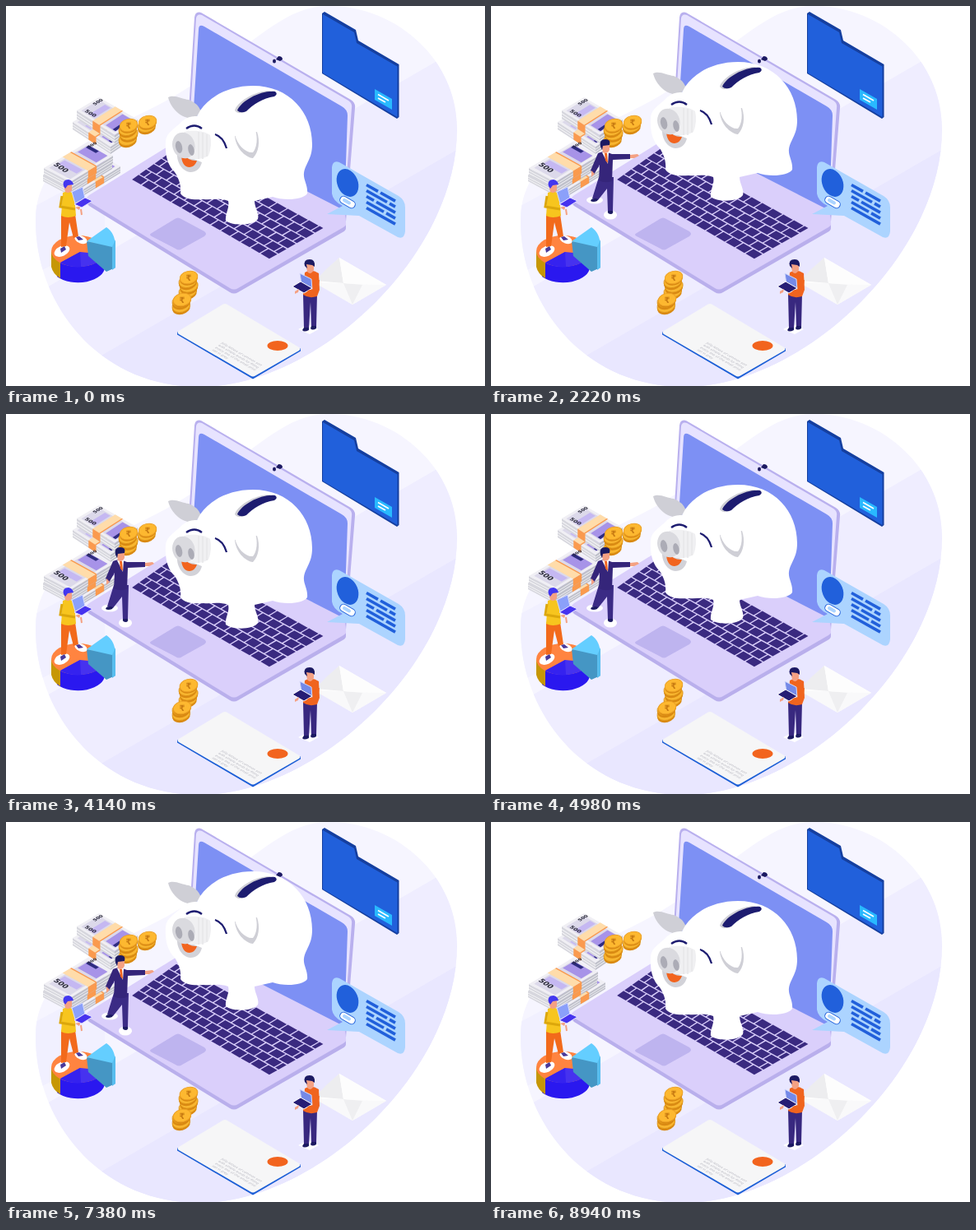
These frames come from a looping animation (582 by 462 pixels, 9000 ms). An HTML page:

```html
<!DOCTYPE html>
<html lang="en">
<head>
<meta charset="utf-8">
<title>Savings scene</title>
<style>
  html, body { margin: 0; width: 100%; height: 100%; overflow: hidden; background: #fff; }
  svg { display: block; width: 582px; height: 462px; }
  text { font-family: "DejaVu Sans", "Noto Sans", sans-serif; }
</style>
</head>
<body>
<svg viewBox="0 0 582 462" xmlns="http://www.w3.org/2000/svg">
  <defs>
    <clipPath id="blob">
      <path d="M390 0C470 -2 548 62 548 150C548 303 378 463 235 463C112 463 36 362 36 262C36 190 95 165 170 128C275 78 325 0 390 0Z"/>
    </clipPath>
  </defs>

  <g clip-path="url(#blob)">
    <path d="M0 0H582V462H0Z" fill="#f6f5ff"/>
    <path d="M582 33L0 371V462H582Z" fill="#efedff"/>
    <path d="M582 155L52 462H582Z" fill="#e9e7ff"/>
    <path d="M0 262L120 198V280L0 345Z" fill="#f1f0ff"/>
  </g>

  <!-- laptop lid -->
  <path d="M229 14Q230 6 237 8L419 114Q425 118 424 124L413 262L220 160Z" fill="#b9b0ee"/>
  <path d="M231 15Q232 9 238 11L416 115Q421 118 420 124L410 260L222 160Z" fill="#e7e3ff"/>
  <path d="M234 29Q234 21 241 25L408 122Q415 126 415 133L411 250L226 156Z" fill="#7d90f4"/>
  <ellipse cx="326" cy="67" rx="2" ry="2.5" fill="#1c1a62"/>
  <path d="M328 65L331 61Q336 61 336 65L333 67Z" fill="#1c1a62"/>

  <!-- laptop base -->
  <path d="M97 233L277 341L413 265V270Q413 273 409 275L282 348Q277 351 272 348L101 243Q97 240 97 233Z" fill="#b9afec"/>
  <path d="M101 230L214 160Q220 153 226 154L410 248Q413 255 413 264Q414 267 410 269L282 343Q277 346 272 343L101 238Q95 234 101 230Z" fill="#dacffb"/>
  <path d="M177 276L205 259Q209 256 213 259L241 274Q245 277 241 280L214 295Q210 298 206 295L177 280Q173 278 177 276Z" fill="#beb4ef"/>
  <g id="keys" fill="#3a2a80"></g>

  <!-- folder -->
  <path d="M384 9L387 7L425 29L428 42L477.500 71V135L475 137L384 82Z" fill="#153f9f"/>
  <path d="M385 10L423 32L426 45L475.500 73.500V135L385 81.500Z" fill="#2160db"/>
  <path d="M448 101L469 113V126L448 114Z" fill="#29b9ff"/>
  <path d="M452 107.500L465 115M452 112L461 117" stroke="#fff" stroke-width="1.700"/>

  <!-- speech bubble -->
  <path d="M396 196Q397 187 405 190L477 231Q485 236 485 245V274Q484 284 476 281L429 255L390 253L409 243Q397 237 396 228Z" fill="#acd4ff"/>
  <ellipse cx="415" cy="215" rx="12.500" ry="17.500" transform="rotate(-22 415 215)" fill="#2160db"/>
  <rect x="405" y="234" width="20" height="9" rx="4.500" transform="rotate(30 415 238.500)" fill="#fff" stroke="#2160db"/>
  <path d="M411 236L417 239.500" stroke="#acd4ff" stroke-width="4" stroke-linecap="round"/>
  <g id="lines" stroke="#2160db" stroke-width="3.600"></g>

  <!-- envelope -->
  <path d="M405 306L462 339L421 363L374 335Z" fill="#fff"/>
  <path d="M405 306L410 337L376 334L389 320Z" fill="#ededef"/>
  <path d="M410 337L462 339L421 363L374 336Z" fill="#f9f9fa"/>
  <path d="M410 337L433 339L421 363Z" fill="#efeff1"/>
  <path d="M405 306L462 339L425 338L410 337Z" fill="#fdfdfd"/>

  <!-- bank card -->
  <path d="M208 396L300 450L358 416V419.500L300 453.500L208 399.500Z" fill="#1c5fd6"/>
  <path d="M210 395L263 363Q266 361 269 363L356 415Q359 417 356 419L303 449.500Q300 451.500 297 449.500L210 399Q207 397 210 395Z" fill="#f6f6f7"/>
  <ellipse cx="330" cy="413" rx="12.500" ry="6" fill="#f2641e"/>
  <g id="print" font-size="4.400" fill="#b4b4bd"></g>

  <g id="money"></g>
  <g id="coins"></g>

  <!-- piggy bank -->
  <g id="pig">
    <path d="M197 111C204 107 214 113 222 114Q233 118 237 128L230 136C216 139 201 127 197 111Z" fill="#cfcfd6"/>
    <path d="M236 127C248 109 272 97 300 97C344 97 372 129 372 168C372 186 364 191 362 203C361 212 367 217 366 228C361 236 337 237 324 232L302 237C302 245 308 252 306 259C301 267 275 268 267 261C266 252 272 246 270 237C258 233 250 236 240 235C228 236 217 235 212 228C213 220 211 211 205 202C196 193 193 181 194 164C195 153 207 148 214 140Q222 133 232 134Z" fill="#fff"/>
    <path d="M278 127C280 117 303 102 322 103L290 129Q281 132 278 127Z" fill="#cfcfd6"/>
    <path d="M281 127C286 115 310 102 327 104Q331 107 326 110C312 112 300 120 292 128Q285 131 281 127Z" fill="#1d1c70"/>
    <path d="M278 158C279 172 290 184 300 185C307 178 309 165 305 153Z" fill="#cfcfd6"/>
    <path d="M278 156C281 169 291 179 300 178C305 172 306 160 303 151C295 143 282 146 278 156Z" fill="#fff"/>
    <path d="M208 178C207 190 214 201 224 202C231 202 236 198 238 190Z" fill="#d2d2d8"/>
    <path d="M216 153C231 150 243 153 248 157Q251 169 246 182C238 187 228 187 220 185Z" fill="#f0f0f2"/>
    <path d="M234 153V186M239 154V186M244 156V183" stroke="#e6e6e9" stroke-width="1.500"/>
    <path d="M213 181C213 190 217 196 223 196Q230 195 232 188Q222 189 216 180Z" fill="#f2641e"/>
    <ellipse cx="216" cy="169.500" rx="13.500" ry="16" transform="rotate(-18 216 170)" fill="#dadadf"/>
    <ellipse cx="210" cy="171.500" rx="4" ry="7.500" transform="rotate(-12 210 171)" fill="#acacb6"/>
    <ellipse cx="225" cy="175" rx="3.600" ry="7" transform="rotate(-12 225 175)" fill="#acacb6"/>
    <path d="M219 149Q229 142 238 149M254 156Q264 159 268 173" fill="none" stroke="#1d1c70" stroke-width="2.300"/>
  </g>

  <!-- man in a suit -->
  <g id="guide">
    <ellipse cx="126" cy="236" rx="10" ry="4.500" fill="#fff"/>
    <ellipse cx="145" cy="254" rx="8" ry="5.500" fill="#fff"/>
    <path d="M131 208L149 208L148 249L142 250L141 222L130 236L123 234Z" fill="#3b2b85"/>
    <path d="M122 235Q126 233 130 235L129 237Q124 239 121 237Z" fill="#1c1a62"/>
    <path d="M142 249L148 249Q149 252 146 253Q141 253 142 249Z" fill="#1c1a62"/>
    <path d="M130 179Q137 175 147 180L169 180V186L148 187L147 213Q138 216 131 212L132 193L125 205L121 200Z" fill="#35257a"/>
    <path d="M135 178L143 178L142 192Z" fill="#fff"/>
    <path d="M138 179L141 179L142 191L139 188Z" fill="#f2641e"/>
    <path d="M169 181L178 180L180 182L174 185L169 185ZM122 200L126 204L122 208Z" fill="#f4a183"/>
    <path d="M134 167H144V175Q141 181 136 178Z" fill="#f4a183"/>
    <path d="M133 171Q131 162 139 162Q146 162 144 169L136 170L135 175Z" fill="#1c1a62"/>
  </g>

  <!-- pie chart -->
  <path d="M62 309V329A32.500 19 0 0 0 120 317V298Z" fill="#2a18ef"/>
  <path d="M55 298V317Q57 326 66 331V310Z" fill="#c69705"/>
  <ellipse cx="87.500" cy="298" rx="32.500" ry="19" fill="#ff8440"/>
  <path d="M90 299L66 312A32.500 19 0 0 0 120 302Z" fill="#4632ef"/>
  <path d="M90 299L66 312A32.500 19 0 0 0 91 317Z" fill="#3522ef"/>
  <path d="M98 286L133 292V318L122 323L100 304Z" fill="#4596c4"/>
  <path d="M98 286L122 269Q133 276 133 294L129 293Z" fill="#64ceff"/>
  <path d="M129 293L133 284V318L129 321Z" fill="#58bdee"/>

  <!-- person in yellow -->
  <ellipse cx="68" cy="298" rx="10" ry="6" transform="rotate(-25 68 298)" fill="#fff"/>
  <ellipse cx="91" cy="284" rx="8" ry="4.500" transform="rotate(22 91 284)" fill="#fff"/>
  <path d="M67 253H84L88 280L82 282L77 263L73 292L67 293Z" fill="#f26a1b"/>
  <path d="M66 295L71 292L73 296L67 300ZM85 281L89 280L94 284L88 285Z" fill="#4a3a9a"/>
  <path d="M69 227Q77 223 83 229L85 255Q75 259 67 255Z" fill="#f7c51e"/>
  <path d="M68 231L66 244L84 247" fill="none" stroke="#dca70c" stroke-width="3"/>
  <path d="M70 217H80V224Q77 229 72 226ZM84 245L91 243L89 248Z" fill="#f4a183"/>
  <path d="M70 219Q68 211 76 211Q81 212 82 217L75 218L72 222Z" fill="#4337ef"/>
  <path d="M80 226L93 220L96 234L84 240Z" fill="#8ba0fa" stroke="#d7dcff"/>
  <path d="M83 241L96 233L105 237L92 245Z" fill="#4633ef" stroke="#e5e2ff"/>
  <path d="M91 247L92 254" stroke="#f4a183" stroke-width="2"/>

  <!-- man in orange -->
  <path d="M355 393L367 387L380 393L369 399Z" fill="#fff"/>
  <path d="M361 350H378L377 390H371L370 360L368 392H362Z" fill="#38287f"/>
  <path d="M362 391H368V394Q362 397 360 394ZM371 389H377V392Q372 395 370 392Z" fill="#1c1a62"/>
  <path d="M363 324Q371 319 380 325L381 345L378 353Q368 356 361 351Z" fill="#f0641e"/>
  <path d="M364 313H374V321Q370 328 366 323Z" fill="#f4a183"/>
  <path d="M363 316Q361 308 369 308Q376 308 375 317L372 315L365 314L366 319Z" fill="#1c1a62"/>
  <path d="M357 325L371 332L372 345L359 338Z" fill="#7489e8" stroke="#d4dafb"/>
  <path d="M348 341L358 335L372 343L362 349Z" fill="#261d75" stroke="#fff"/>
  <path d="M379 333L377 345L367 348" fill="none" stroke="#f0641e" stroke-width="4"/>
  <path d="M351 347L356 344L355 348L351 350Z" fill="#f4a183"/>
</svg>

<script>
const $ = id => document.getElementById(id);
const mix = (a, b, k) => [a[0] + (b[0] - a[0]) * k, a[1] + (b[1] - a[1]) * k];
const shift = (p, x, y) => [p[0] + x, p[1] + y];
const poly = (pts, fill) =>
  `<polygon points="${pts.map(p => p.map(n => n.toFixed(1))).join(" ")}"${fill ? ` fill="${fill}"` : ""}/>`;
const inQuad = ([a, b, c, d], u, v) => mix(mix(a, b, u), mix(d, c, u), v);
const patch = (q, u0, u1, v0, v1, fill) =>
  poly([[u0, v0], [u1, v0], [u1, v1], [u0, v1]].map(([u, v]) => inQuad(q, u, v)), fill);

function drawKeys() {
  const board = [[152, 211], [320, 308], [387, 270], [207, 172]];
  const rows = 6, cols = 14;
  let out = "";
  for (let r = 0; r < rows; r++) {
    const v0 = (r + 0.06) / rows, v1 = (r + 0.93) / rows;
    const slide = r % 2 ? 0.45 : 0;
    for (let c = 0; c < cols + (slide ? 1 : 0); c++) {
      const left = Math.max(0, c - slide), right = Math.min(cols, c + 1 - slide);
      out += patch(board, (left + 0.05) / cols, (right - 0.06) / cols, v0, v1);
    }
  }
  $("keys").innerHTML = out;
}

function drawLines() {
  const rows = [[438, 452, 455, 473], [438, 463, 466, 473], [438, 447, 450, 473],
    [438, 459, 462, 473], [438, 473, 0, 0]];
  const y = (x, i) => 217.5 + i * 7 + (x - 438) * 0.56;
  $("lines").innerHTML = rows.map(([a, b, c, d], i) =>
    `<path d="M${a} ${y(a, i)}L${b} ${y(b, i)}${c ? `M${c} ${y(c, i)}L${d} ${y(d, i)}` : ""}"/>`).join("");
}

function drawPrint() {
  const copy = ["Jolly letters of common sort", "with simple words for filling", "every line of the small print", "set in grey"];
  $("print").innerHTML = copy.map((s, i) =>
    `<text transform="matrix(.8 .46 -.8 .46 ${261 - i * 3.7} ${410 + i * 2.8})">${s}</text>`).join("");
}

// quad order: left, back, right, front
function bundle(q, high, alongLeft) {
  const [l, b, r, f] = q, drop = p => shift(p, 0, high);
  const leftSide = [l, f, drop(f), drop(l)], rightSide = [f, r, drop(r), drop(f)];
  let out = poly(leftSide, "#d6d6dd") + poly(rightSide, "#bfc0ca");
  for (const k of [0.3, 0.65])
    out += patch(leftSide, 0, 1, k, k + 0.12, "#f5f5f7") + patch(rightSide, 0, 1, k, k + 0.12, "#eeeef2");
  out += poly(q, "#f0eff4");
  // u runs along the long side of the note
  const face = alongLeft ? [l, b, r, f] : [l, f, r, b];
  out += patch(face, 0.06, 0.94, 0.1, 0.9, "#dcd9ea");
  out += patch(face, 0.68, 0.94, 0.14, 0.88, "#a793e8") + patch(face, 0.24, 0.38, 0.15, 0.85, "#c5b8f2");
  out += patch(face, 0.86, 0.93, 0.15, 0.55, "#2e2c80");
  out += patch(face, 0.42, 0.6, 0, 1, "#ffdcaa") + patch(face, 0.59, 0.62, 0, 1, "#fa9a4e");
  out += patch(alongLeft ? rightSide : leftSide, 0.42, 0.62, 0, 1, "#fa9a4e");
  return out;
}

function drawMoney() {
  const upper = [[86, 127], [113, 111], [160, 138], [132, 157]];
  const lower = [[46, 197], [100, 165], [130, 182], [78, 214]];
  const moved = (q, x, y) => q.map(p => shift(p, x, y));
  const label = (s, m, size) =>
    `<text transform="matrix(${m})" font-size="${size}" font-weight="700" fill="#282838">${s}</text>`;
  $("money").innerHTML =
    bundle(moved(upper, -5, 14), 9, false) + bundle(upper, 10, false) +
    label("500", ".84 .5 -.7 .5 95 128", 7) + label("500", ".84 -.52 .75 .5 108 121", 6) +
    bundle(moved(lower, 9, 13), 8, true) + bundle(moved(lower, -1, 8), 8, true) +
    bundle(lower, 9, true) +
    label("500", ".8 .52 -.8 .48 57 193", 9) + label("500", ".8 -.48 .7 .46 101 173", 6);
}

function coin(x, y, count) {
  const disc = (dx, dy, fill, extra = "") =>
    `<ellipse cx="${x + dx}" cy="${y + dy}" rx="11" ry="7.6" transform="rotate(-14 ${x} ${y + dy})" fill="${fill}" ${extra}/>`;
  let out = "";
  for (let i = count; i > 0; i--) {
    const lean = i % 2 ? -1.2 : 0.4;
    out += disc(lean, i * 6 + 1, "#d98912") + disc(lean, i * 6 - 1.5, "#f8b52f", 'stroke="#dc9218" stroke-width=".8"');
  }
  return out + disc(0, 2, "#d98912") + disc(0, 0, "#fdb830", 'stroke="#eca126"') +
    `<text x="${x}" y="${y + 4}" text-anchor="middle" font-size="10" font-weight="700" fill="#c87b13">₹</text>`;
}

function drawCoins() {
  $("coins").innerHTML = coin(149, 145, 3) + coin(172, 141, 1) + coin(222, 330, 3) + coin(214, 357, 1.5);
}

// [time, value] steps, linear between
const BOB = [[0, 0], [2070, -31], [4500, 0], [6750, -51.5], [9000, 0]];
const SHOW = [[0, 0], [400, 0], [1000, 1], [8000, 1], [8600, 0], [9000, 0]];

function at(steps, t) {
  const i = steps.findIndex(s => s[0] > t);
  const [t0, v0] = steps[i - 1], [t1, v1] = steps[i];
  return v0 + (v1 - v0) * (t - t0) / (t1 - t0);
}

function frame() {
  const t = performance.now() % 9000;
  const show = at(SHOW, t);
  $("pig").setAttribute("transform", `translate(0 ${Math.round(at(BOB, t))})`);
  $("guide").setAttribute("transform", `translate(${(show - 1) * 64} 0)`);
  $("guide").setAttribute("opacity", show);
  requestAnimationFrame(frame);
}

drawKeys();
drawLines();
drawPrint();
drawMoney();
drawCoins();
frame();
</script>
</body>
</html>
```
